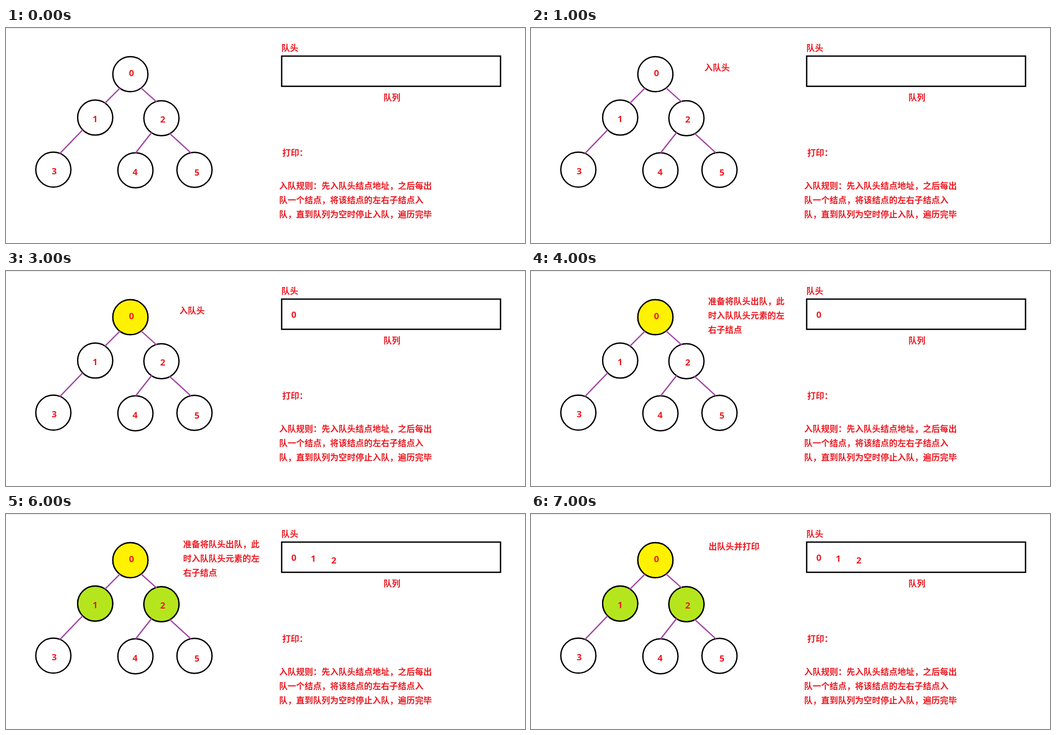
Animation, 1162 px wide and 482 px high, one loop 8000 ms. Source, as an HTML page:

```html
<!DOCTYPE html>
<html lang="zh-CN">
<head>
<meta charset="utf-8">
<style>
  html, body { margin: 0; width: 100%; height: 100%; overflow: hidden; background: #fff; }
  svg { display: block; }
  text { font: bold 19px "Noto Sans CJK SC", "Noto Sans CJK", sans-serif; fill: #ed1c24; }
  .digit { font: bold 20px "Open Sans", "Noto Sans", sans-serif; text-anchor: middle; }
  .box, circle { fill: #fff; stroke: #000; stroke-width: 3; }
  .edges { stroke: #a349a4; stroke-width: 3; stroke-linecap: round; }
</style>
</head>
<body>
<svg id="stage" width="1162" height="482" viewBox="0 0 1162 482">
  <rect width="1162" height="1" fill="#dcdcdc"/>
  <rect class="box" x="617.2" y="63" width="490" height="67.7"/>
</svg>
<script>
const LOOP = 8000;
const stage = document.getElementById('stage');
const timed = [];

function add(tag, attrs, text = '') {
  const el = document.createElementNS('http://www.w3.org/2000/svg', tag);
  for (const key in attrs) el.setAttribute(key, attrs[key]);
  el.textContent = text;
  stage.append(el);
  return el;
}

// Shows an element only between two times of the loop.
const during = (el, from, to = LOOP) => timed.push({ el, from, to });

// Left-aligned lines, 32px apart; y is the first baseline.
const label = (x, y, ...lines) =>
  lines.map((line, i) => add('text', { x, y: y + 32 * i }, line));

// A digit centred on x, y.
const digit = (n, x, y) => add('text', { class: 'digit', x, y: y + 7.2 }, n);

// Circle centre, digit centre, then the fill and its start time.
const nodes = [
  [278.5, 103.5, 281, 101, '#fff200', 2000],
  [199.7, 200.8, 199.5, 203.3, '#b5e61d', 5000],
  [348, 202.3, 351, 204.3, '#b5e61d', 5000],
  [106, 317.5, 108, 320.7],
  [289.8, 319, 289, 322.5],
  [422, 318, 427.5, 323.5]
];
nodes.forEach(([cx, cy, x, y, fill, from]) => {
  add('circle', { cx, cy, r: 39.3 });
  if (fill) during(add('circle', { cx, cy, r: 39.3, style: `fill:${fill}` }), from);
});
nodes.forEach(([, , x, y], n) => digit(n, x, y));

add('path', {
  class: 'edges',
  d: 'M255 135L222 168M303 135L336.5 165M171 229L121.5 280.5M325.5 235L291 279M367 237L413 279'
});

label(616.5, 51.7, '队头');
label(845, 162.5, '队列');
label(618.5, 286.5, '打印：');
label(611.5, 360.5,
  '入队规则：先入队头结点地址，之后每出',
  '队一个结点，将该结点的左右子结点入',
  '队，直到队列为空时停止入队，遍历完毕');

label(388, 95.7, '入队头').forEach(el => during(el, 1000, 4000));
label(396.5, 75, '准备将队头出队，此', '时入队队头元素的左', '右子结点')
  .forEach(el => during(el, 4000, 7000));
label(397.5, 80.2, '出队头并打印').forEach(el => during(el, 7000));

during(digit(0, 644.5, 98), 3000);
during(digit(1, 688, 99.5), 6000);
during(digit(2, 734, 103.7), 6000);

function draw(now) {
  const t = now % LOOP;
  for (const { el, from, to } of timed)
    el.setAttribute('visibility', t >= from && t < to ? 'visible' : 'hidden');
}

const start = performance.now();
function tick() {
  draw(performance.now() - start);
  requestAnimationFrame(tick);
}
tick();
</script>
</body>
</html>
```
